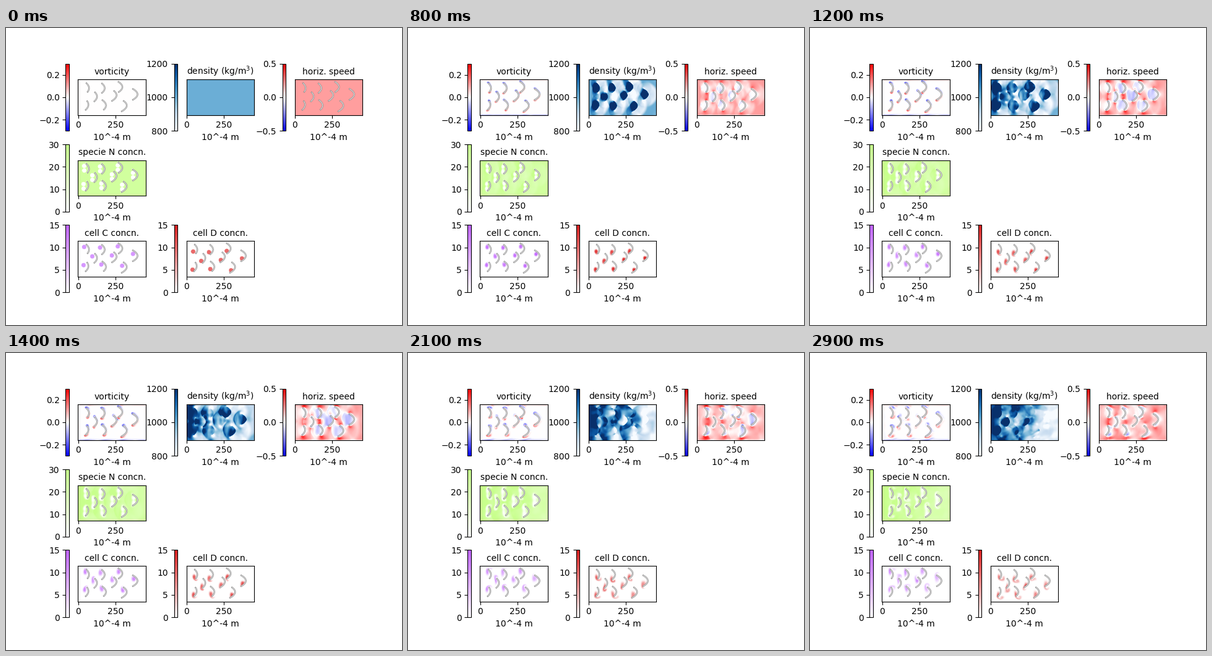
Write a matplotlib script that moves like this. It is 640 px wide and 480 px high and loops after 3 s.

```python
import numpy as np
import matplotlib.pyplot as plt
from matplotlib.animation import FuncAnimation
from matplotlib.colors import LinearSegmentedColormap
from matplotlib.patches import Polygon

FRAMES, INTERVAL, STEPS = 30, 100, 5
NX, NY = 225, 118              # fluid cells, each two units wide
WIDTH, HEIGHT = 2 * NX, 2 * NY
UNIT = WIDTH / 109.41          # plot units per screen pixel
U0, N0, CELLS = 0.19, 25, 10   # inflow speed, nutrient and cell concentration
OMEGA, UPTAKE = 1.7, 0.0006

# Barriers: nose of each arc in panel pixels (y down) and its lean.
NOSES = [(17.5, 13, 0.13), (16.5, 42, -0.17), (30.5, 28, -0.07),
         (43, 14, 0), (45, 41, 0.15), (62, 26.5, -0.2),
         (71.5, 12, 0.03), (96, 24, 0), (78.5, 43, -0.18)]
HALF_BAND, DOT_RADIUS = 0.8, 3.5
OFFSET_C, OFFSET_D = (-7.2, -3.2), (-7.1, 4.1)   # cells upstream of each nose


def to_plot(points):
    x, y = np.asarray(points, float).T
    return np.column_stack([x * UNIT, HEIGHT - y * UNIT])


def arc_points(x, y, lean):
    """Parabolic arc with its unit normals; arcs downstream are larger."""
    half, bulge = 7.2 + 0.02 * x, 2.6 + 0.058 * x
    s = np.linspace(-1, 1, 40)
    pts = np.column_stack([x - bulge * s ** 2 + lean * half * s, y + half * s])
    slope = -2 * bulge * s + lean * half
    normal = np.column_stack([np.full_like(s, half), -slope])
    return pts, normal / np.hypot(*normal.T)[:, None]


def arc_outline(nose):
    pts, normal = arc_points(*nose)
    return to_plot(np.vstack([pts + HALF_BAND * normal,
                              (pts - HALF_BAND * normal)[::-1]]))


# Cell centres; one extra wall row below and above the domain.
gx, gy = np.meshgrid(2 * np.arange(NX) + 1.0, 2 * np.arange(-1, NY + 1) + 1.0)


def near(points, radius):
    mask = np.zeros(gx.shape, bool)
    for x, y in to_plot(points):
        mask |= np.hypot(gx - x, gy - y) < radius * UNIT
    return mask


def dots(offset):
    return near([(x + offset[0], y + offset[1]) for x, y, _ in NOSES],
                DOT_RADIUS)


solid = np.zeros(gx.shape, bool)
for nose in NOSES:
    solid |= near(arc_points(*nose)[0], HALF_BAND)
solid[[0, -1]] = True

# Nearest fluid column for every cell, used to fill the barriers.
cols = np.arange(NX)
fill = np.argmin(np.abs(cols[:, None] - cols)[None]
                 + 999 * solid[1:-1, None, :], axis=2)

# D2Q9 lattice.
CX = np.array([0, 1, 0, -1, 0, 1, -1, -1, 1])
CY = np.array([0, 0, 1, 0, -1, 1, 1, -1, -1])
OPP = np.array([0, 3, 4, 1, 2, 7, 8, 5, 6])
W = np.array([4 / 9] + [1 / 9] * 4 + [1 / 36] * 4, np.float32)
cx, cy, w = (v.astype(np.float32)[:, None, None] for v in (CX, CY, W))


def equilibrium(ux, uy):
    cu = cx * ux + cy * uy
    return w * (1 + 3 * cu + 4.5 * cu ** 2 - 1.5 * (ux ** 2 + uy ** 2))


def moments(f):
    m = f.sum(axis=1)
    rho = np.maximum(m[0], 0.2)
    ux, uy = ((c * f[0]).sum(axis=0) / rho for c in (cx, cy))
    return m, np.clip(ux, -0.45, 0.45), np.clip(uy, -0.45, 0.45)


def step(f, inlet):
    m, ux, uy = moments(f)
    bounced = f[:, :, solid][:, OPP]
    f = f + OMEGA * (equilibrium(ux, uy)[None] * m[:, None] - f)
    f[1] *= 1 - UPTAKE * np.clip(m[2] + m[3], 0, 40)
    f[:, :, solid] = bounced
    for k in range(1, 9):
        f[:, k] = np.roll(f[:, k], (CY[k], CX[k]), axis=(1, 2))
    f[:, :, :, 0] = inlet
    return f


def snapshot(f):
    m, ux, uy = moments(f)
    rho, vx, vy = (np.take_along_axis(a[1:-1], fill, axis=1)
                   for a in (m[0], ux, uy))
    curl = np.gradient(vy, axis=1) - np.gradient(vx, axis=0)
    return [curl, 1000 * rho, vx, m[1, 1:-1], m[2, 1:-1], m[3, 1:-1]]


def simulate():
    """Flow, nutrient N and cells C and D started in a sudden uniform stream."""
    dots_c, dots_d = dots(OFFSET_C), dots(OFFSET_D)
    start = np.stack([np.ones(gx.shape),
                      N0 * ~(dots_c | dots_d | solid),
                      CELLS * (dots_c & ~solid),
                      CELLS * (dots_d & ~solid)]).astype(np.float32)
    stream = equilibrium(np.float32(U0), np.float32(0))
    f = stream[None] * start[:, None]
    f[0][:, solid] = W[:, None]
    levels = np.array([1, N0, 0, 0], np.float32)
    inlet = levels[:, None, None] * stream[None, :, :, 0]
    shots = [snapshot(f)]
    for _ in range(FRAMES - 1):
        for _ in range(STEPS):
            f = step(f, inlet)
        shots.append(snapshot(f))
    return shots


def fade(name, top):
    return LinearSegmentedColormap.from_list(name, ["white", top])


# position, title, colour map, value range, colour bar tick step
PANELS = [
    (1, "vorticity", "bwr", (-0.3, 0.3), 0.2),
    (2, "density (kg/m$^3$)", "Blues", (800, 1200), 200),
    (3, "horiz. speed", "bwr", (-0.5, 0.5), 0.5),
    (4, "specie N concn.", fade("n", "#c8ff8c"), (0, 30), 10),
    (7, "cell C concn.", fade("c", "#c264ff"), (0, 15), 5),
    (8, "cell D concn.", fade("d", "#de1e1e"), (0, 15), 5),
]


def add_panel(pos, title, cmap, limits, tick, field):
    lo, hi = limits
    ax = fig.add_subplot(3, 3, pos)
    im = ax.imshow(field, cmap=cmap, vmin=lo, vmax=hi, origin="lower",
                   extent=(-0.5, WIDTH - 0.5, 0, HEIGHT))
    ticks = tick * np.arange(np.ceil(lo / tick), np.floor(hi / tick) + 1)
    fig.colorbar(im, ax=ax, location="left", ticks=ticks)
    ax.set_title(title, fontsize=10)
    ax.set_xlabel("10^-4 m")
    ax.set_xticks([0, 250])
    ax.set_yticks([])
    if not title.startswith("density"):
        for nose in NOSES:
            ax.add_patch(Polygon(arc_outline(nose), facecolor="white",
                                 edgecolor="#8c8c8c", linewidth=0.6))
    return im


def update(i):
    for im, field in zip(images, shots[i]):
        im.set_data(field)
    return images


shots = simulate()
fig = plt.figure(figsize=(6.4, 4.8), dpi=100)
images = [add_panel(*panel, field) for panel, field in zip(PANELS, shots[0])]
anim = FuncAnimation(fig, update, frames=FRAMES, interval=INTERVAL,
                     repeat=True, repeat_delay=0, blit=False)
plt.show()
```
